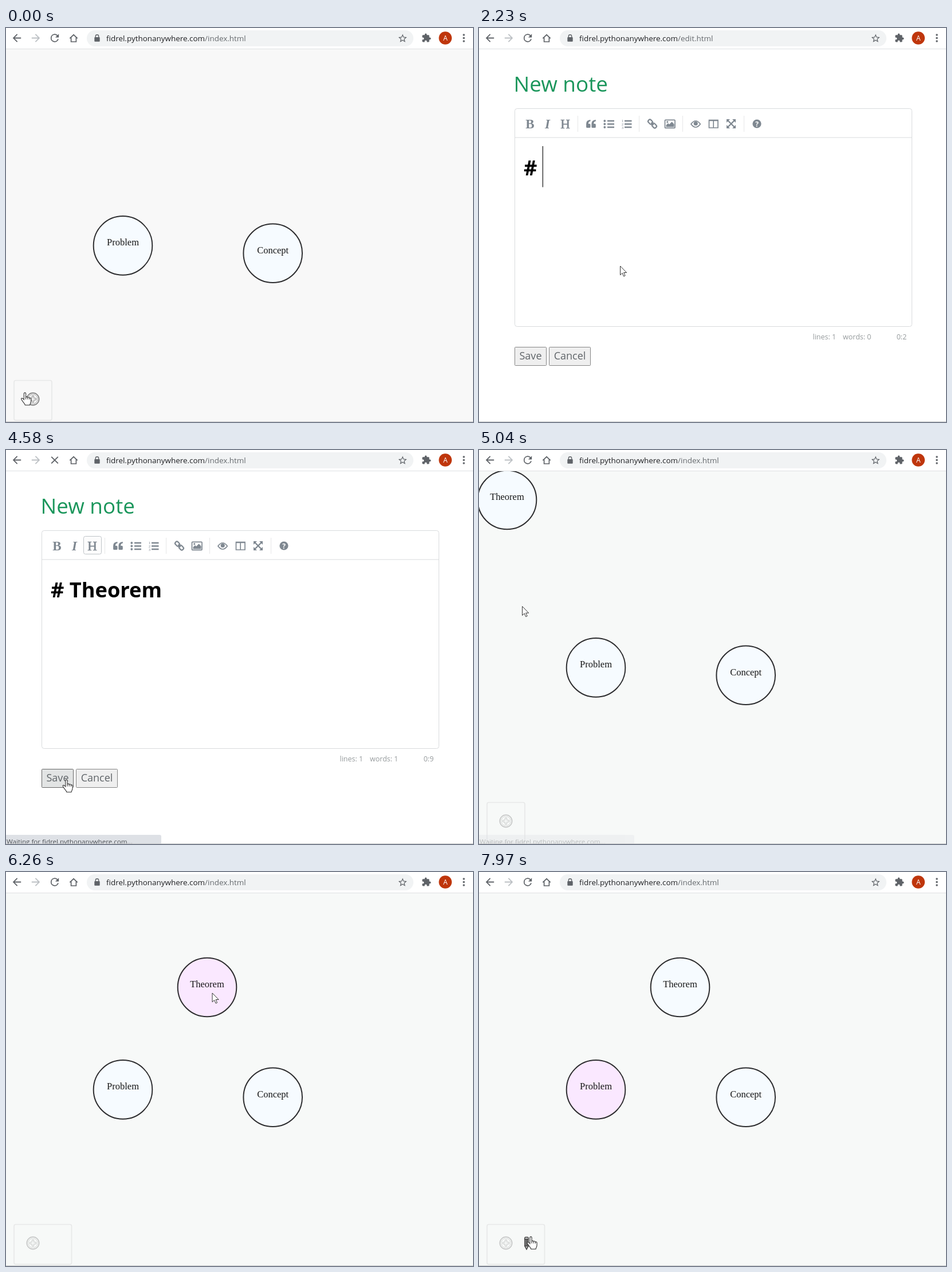
Animation, 815 px wide and 687 px high, one loop 8 s. Source, as an HTML page:

```html
<!DOCTYPE html>
<html lang="en">
<head>
<meta charset="utf-8">
<title>Note graph</title>
<style>
html, body { margin: 0; height: 100%; overflow: hidden; background: #fff; }
svg { display: block; font-family: "Open Sans", sans-serif; }
text { white-space: pre; }
.node circle { stroke: #2d2d2f; stroke-width: 2; }
.node text { font: 16.5px "Liberation Serif", serif; text-anchor: middle; fill: #161616; }
.tools { fill: #7f8891; stroke: #7f8891; stroke-width: 0; }
.tools text { font-family: "Liberation Serif", serif; text-anchor: middle; }
.line { fill: none; stroke-width: 1.7; }
.info { font-size: 12.5px; fill: #959a9c; }
.btn rect { fill: #efefef; stroke: #868686; }
.btn text { font-size: 18px; text-anchor: middle; fill: #5f6468; }
.chrome { fill: #5f6368; }
</style>
</head>
<body>
<svg width="815" height="687" viewBox="0 0 815 687">
  <g id="index">
    <rect id="bg" width="815" height="687"/>
    <rect id="panel" x="14" y="614.5" width="66" height="69.5" rx="3" fill="none" stroke="#e7e8e8" stroke-width="1.6"/>
    <g id="plus" transform="translate(47 647)" fill="none" stroke="#777">
      <circle r="10.7" stroke-width="1.5"/>
      <circle r="8.3" stroke-width=".7"/>
      <path d="M-1.5-5.5h3v4h4v3h-4v4h-3v-4h-4v-3h4z" stroke-width=".9"/>
    </g>
    <g id="pencil" fill="#aaa" stroke="#333" stroke-width="1.2">
      <path d="M79.7 638.5q0-2 2-2h2.6q2 0 2 2V652L83 658.3 79.7 652z"/>
      <path d="M79.7 640.5h6.6M79.7 652h6.6M82 641v11M84.2 641v11"/>
    </g>
    <g id="nodes"></g>
  </g>

  <g id="edit">
    <rect width="815" height="687" fill="#fff"/>
    <text x="60.5" y="111" font-size="36.8" fill="#1a965b">New note</text>
    <rect x="62.5" y="140.5" width="693" height="380" rx="4" fill="none" stroke="#d9dbdd"/>
    <path d="M63 191h692" stroke="#d9dbdd"/>
    <path d="M172.5 153v28M279.5 153v28M355.5 153v28M462.5 153v28" stroke="#e6e7e8"/>
    <rect id="active" x="135.5" y="150.5" width="31" height="31" rx="3" fill="#fcfcfc" stroke="#bfc4c8"/>
    <g class="tools">
      <text x="89" y="175" font-size="23" font-weight="bold">B</text>
      <text x="119.5" y="175" font-size="23" font-weight="bold" font-style="italic">I</text>
      <text x="150.5" y="175" font-size="23" stroke-width=".6">H</text>
      <path id="quote" d="M194.5 160v2.4q-3.6.4-3.6 4.6h2q1.6 0 1.6 1.6v3.8q0 1.6-1.6 1.6h-4.2q-1.6 0-1.6-1.6V167q0-6.5 7.4-7z"/>
      <use href="#quote" x="9.3"/>
      <path d="M224 162h12M224 167.5h12M224 173h12M254 162h12.5M254 167.5h12.5M254 173h12.5" stroke-width="2.5"/>
      <circle cx="219.3" cy="162" r="1.9"/><circle cx="219.3" cy="167.5" r="1.9"/><circle cx="219.3" cy="173" r="1.9"/>
      <g font-size="7"><text x="250.5" y="163.5">1</text><text x="250.5" y="169.8">2</text><text x="250.5" y="176">3</text></g>
      <g class="line" transform="translate(302.5 167) rotate(45)" style="stroke-width:2.2">
        <rect x="-9" y="-3" width="8.5" height="6" rx="2.6"/><rect x=".5" y="-3" width="8.5" height="6" rx="2.6"/><path d="M-3 0h6"/>
      </g>
      <rect class="line" x="324.5" y="160.3" width="17.5" height="14" rx="1"/>
      <path d="M326.5 172.5v-3l3.5-3.5 2 2 4.5-4.5 4 4v5z"/><circle cx="328.8" cy="163.8" r="1.6"/>
      <path class="line" d="M370 167.5q8-11 16.300 0-8.300 11-16.300 0z"/><circle cx="378.200" cy="166.500" r="3.600"/>
      <path class="line" d="M401.500 160.500h15.500v13.500h-15.500zM409.200 161v13M401 161.300h16"/>
      <g transform="translate(440 167)"><path d="M-6-6 6 6M6-6-6 6" stroke-width="2.300"/><path d="M-8-8h6l-6 6zM8-8v6l-6-6zM8 8h-6l6-6zM-8 8v-6l6 6z"/></g>
      <circle cx="485" cy="167" r="7.600"/>
      <text x="485" y="171.500" font-size="12" style="font-family:'Open Sans',sans-serif;font-weight:bold;fill:#fff">?</text>
    </g>
    <text id="note" x="78" y="256.500" font-size="36.200" font-weight="bold"></text>
    <rect id="caret" y="206" width="1.100"/>
    <g class="info">
      <text x="582.500" y="543">lines: 1</text>
      <text id="words" x="635" y="543"></text>
      <text id="pos" x="746.300" y="543" text-anchor="end"></text>
    </g>
    <g class="btn">
      <rect id="save" x="62.500" y="556.500" width="55" height="32" rx="1"/><text x="90" y="578">Save</text>
      <rect x="122.500" y="556.500" width="72" height="32" rx="1"/><text x="158.500" y="578">Cancel</text>
    </g>
  </g>

  <g class="chrome">
    <rect width="815" height="37" fill="#fff"/>
    <path d="M0 36.500h815" stroke="#dfe1e3"/>
    <rect x="141" y="4" width="570" height="28" rx="14" fill="#f1f3f4"/>
    <path id="back" transform="translate(8.200 6.700) scale(.9)" d="M20 11H7.830l5.590-5.590L12 4l-8 8 8 8 1.410-1.410L7.830 13H20z"/>
    <use href="#back" transform="matrix(-1 0 0 1 71 0)" fill="#bcc0c4"/>
    <path id="reload" transform="translate(74.200 6.700) scale(.9)" d="M17.650 6.350A8 8 0 1 0 19.730 14h-2.080A6 6 0 1 1 12 6c1.660 0 3.140.690 4.220 1.780L13 11h7V4z"/>
    <path id="stop" d="M79.200 11.800l11.600 11.600M90.800 11.800 79.200 23.400" stroke="#5f6368" stroke-width="1.900"/>
    <path d="M111.300 18.200 118 11.800l6.700 6.400M113.600 16.500v7.500h8.800v-7.500" fill="none" stroke="#5f6368" stroke-width="1.700"/>
    <rect x="154.300" y="16" width="9.400" height="7.800" rx="1"/>
    <path d="M156.300 16.500v-2a2.700 2.700 0 0 1 5.400 0v2" fill="none" stroke="#5f6368" stroke-width="1.400"/>
    <text x="175" y="23" font-size="13.450" fill="#202124">fidrel.pythonanywhere.com<tspan id="path" fill="#666a6e"></tspan></text>
    <path transform="translate(683.200 9) scale(.75)" d="M22 9.240l-7.190-.620L12 2 9.190 8.630 2 9.240l5.460 4.730L5.820 21 12 17.270 18.180 21l-1.630-7.030zM12 15.400l-3.760 2.270 1-4.280-3.320-2.880 4.380-.380L12 6.100l1.710 4.040 4.380.380-3.320 2.880 1 4.280z"/>
    <path transform="translate(725 8.700) scale(.72)" d="M20.500 11H19V7c0-1.100-.900-2-2-2h-4V3.500a2.500 2.500 0 0 0-5 0V5H4c-1.100 0-2 .900-2 2v3.800h1.500a2.700 2.700 0 0 1 0 5.400H2V20c0 1.100.900 2 2 2h3.800v-1.500a2.700 2.700 0 0 1 5.400 0V22H17c1.100 0 2-.900 2-2v-4h1.500a2.500 2.500 0 0 0 0-5z"/>
    <circle cx="766.700" cy="17.500" r="11.300" fill="#bf360c"/>
    <text x="766.700" y="22" font-size="12" fill="#fff" text-anchor="middle">A</text>
    <circle cx="799" cy="12" r="1.800"/><circle cx="799" cy="17.500" r="1.800"/><circle cx="799" cy="23" r="1.800"/>
  </g>

  <g id="status">
    <path d="M0 671h268q3 0 3 3v13H0z" fill="#dee1e6"/>
    <text id="message" x="1" y="687" font-size="11.600" fill="#4d5156"></text>
  </g>
  <path d="M0 686.500h815" stroke="#c9cacb"/>

  <g id="mouse">
    <circle id="glow" r="12.500" fill="#ff0" fill-opacity=".5"/>
    <path id="arrow" d="M.5.5v15.700l3.600-3.400 2.500 5.700 2.500-1.100-2.500-5.400h5z" fill="#fff" stroke="#333"/>
    <path id="hand" d="M-1.600 1.400c0-2.100 3.200-2.100 3.200 0V8c.6-1.400 3-1.100 3.200.3.800-1 2.800-.6 3.100.9 1-.7 2.700-.2 2.700 1.600v3.700c0 3.500-1.800 4-2 7H.3C.1 19-2.500 17.500-4.200 14.500c-1-1.800-2.600-3.100-2.200-4.200.6-1.500 2.800-.9 4.800 1.700zM1.600 8v3.500M4.800 8.300v3.300M7.900 9.200v2.600" fill="#fff" stroke="#333" stroke-width="1.100"/>
  </g>
</svg>
<script>
const $ = id => document.getElementById(id);
const show = (id, on) => $(id).style.display = on ? '' : 'none';
const set = (el, attrs) => { for (const k in attrs) el.setAttribute(k, attrs[k]); };
const within = (t, a, b) => t >= a && t < b;
const place = (el, [x, y]) => set(el, { transform: `translate(${x} ${y})` });

// Each move: first change, last change, number of steps, end x, end y
const mouseMoves = [
  [960, 1290, 6, 246, 414.5], [3890, 4310, 7, 105.5, 575], [4710, 5250, 8, 61, 132],
  [5450, 5520, 2, 58, 97], [5720, 5720, 1, 124.5, 118.5], [5790, 5850, 2, 359.5, 210.5],
  [6330, 6660, 6, 90.5, 636], [6860, 7000, 3, 72, 659], [7070, 7210, 3, 204, 374],
  [7350, 7350, 1, 204, 379], [7680, 7970, 5, 90.5, 636]
];
const dragMoves = [[5720, 5720, 1, 81, 97.3], [5790, 5850, 2, 351, 201]];
const keys = [[1100, ''], [1630, '#'], [2230, '# '], [2940, '# The'], [3050, '# Theor'], [3160, '# Theorem']];

function follow(moves, t, [x, y]) {
  for (const [a, b, n, ex, ey] of moves) {
    if (t < a) break;
    const step = Math.floor((t - a) / (b - a || 1) * (n - 1) + 1e-6) + 1;
    const u = Math.min(1, step / n), k = u * u * (3 - 2 * u);
    x += (ex - x) * k;
    y += (ey - y) * k;
  }
  return [x, y];
}

function addNode(label, at) {
  const g = document.createElementNS('http://www.w3.org/2000/svg', 'g');
  set(g, { class: 'node' });
  g.innerHTML = `<circle r="51.3"/><text>${label}</text>`;
  place(g, at);
  $('nodes').append(g);
  return g;
}
const problem = addNode('Problem', [204, 379.4]);
addNode('Concept', [465.7, 392.7]).firstChild.setAttribute('fill', '#f6fbff');
const theorem = addNode('Theorem', [49, 87]);

function drawIndex(t, hand, x) {
  const pink = '#fae8ff', plain = '#f6fbff';
  set($('bg'), { fill: t < 4710 ? '#f8f8f8' : '#f7f9f8' });
  set($('panel'), { width: t < 6120 ? 66 : 100.5 });
  set($('plus'), { opacity: hand && x < 60 ? 1 : .4 });
  show('pencil', t >= 6330);
  set($('pencil'), { opacity: hand && x >= 60 ? 1 : .25 });
  theorem.style.display = t < 4710 ? 'none' : '';
  place(theorem, follow(dragMoves, t, [49, 87]));
  set(theorem.firstChild, { fill: within(t, 5720, 6120) ? '#c9eef1' : within(t, 6120, 7280) ? pink : plain });
  set(problem.firstChild, { fill: t >= 7280 ? pink : plain });
}

function drawEdit(t, hand) {
  const [since, text] = keys.filter(k => k[0] <= t).pop() || keys[0];
  $('note').textContent = text;
  $('words').textContent = 'words: ' + (/\w/.test(text) ? 1 : 0);
  $('pos').textContent = '0:' + text.length;
  show('active', t >= 2300);
  show('caret', within(t, since, 4310) && Math.floor((t - since) / 530) % 2 === 0);
  set($('caret'), { x: 78 + (text ? $('note').getComputedTextLength() : 0), height: text ? 71.5 : 26.5 });
  set($('save'), { style: hand ? 'fill:#e2e4e4;stroke:#666' : '' });
}

function draw(t) {
  const editing = within(t, 760, 4710);
  const [x, y] = follow(mouseMoves, t, [33, 636]);
  const hand = editing ? y > 556 && y < 589 && x > 62 && x < 195 : y > 630 && y < 655 && x < 100;
  show('index', !editing);
  show('edit', editing);
  if (editing) drawEdit(t, hand); else drawIndex(t, hand, x);

  $('path').textContent = within(t, 430, 4450) ? '/edit.html' : '/index.html';
  const loading = within(t, 430, 1030) || within(t, 4380, 4780);
  show('stop', loading);
  show('reload', !loading);

  const early = t < 2000, end = early ? 1430 : 5110;
  show('status', within(t, early ? 500 : 4520, end));
  set($('status'), { opacity: Math.min(1, (end - t) / 200) });
  $('message').textContent = within(t, 960, 2000) ? 'Resolving proxy...' : 'Waiting for fidrel.pythonanywhere.com...';

  place($('mouse'), [x, y]);
  show('hand', hand);
  show('arrow', !hand);
  show('glow', [[130, 330], [4310, 4450], [5520, 6120], [7210, 7350]].some(c => within(t, ...c)));
}

const start = performance.now();
function tick() {
  draw((performance.now() - start) % 8000);
  requestAnimationFrame(tick);
}
tick();
</script>
</body>
</html>
```
